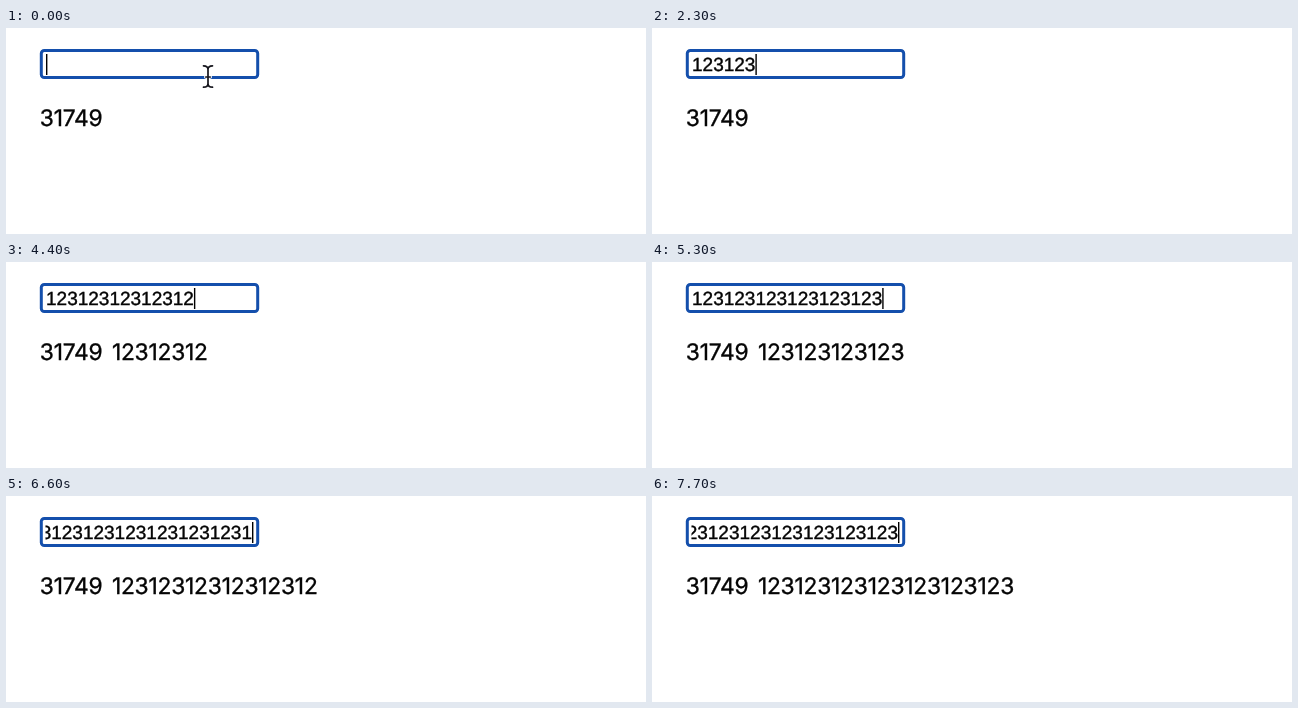
These frames come from a looping animation (640 px wide and 206 px high, 8 s). An HTML page:

```html
<!DOCTYPE html>
<html lang="en">
<head>
<meta charset="utf-8">
<title>Delayed echo</title>
<style>
  html, body { margin: 0; width: 100%; height: 100%; overflow: hidden; background: #fff; }
  svg { display: block; width: 640px; height: 206px; }
  text { fill: #050505; stroke: #050505; text-rendering: geometricPrecision; white-space: pre; }
  .label { font: 22.8px Inter, sans-serif; stroke-width: .35; }
  .entry { font: 19px "Liberation Sans", Arial, sans-serif; stroke-width: .4; }
</style>
</head>
<body>
<svg viewBox="0 0 640 206">
  <clipPath id="inside"><rect x="39.5" y="24" width="209" height="25"/></clipPath>
  <rect x="35.3" y="22.5" width="216.4" height="27" rx="3" fill="#fff" stroke="#144fac" stroke-width="3"/>
  <g clip-path="url(#inside)"><text id="entry" class="entry" x="40" y="42.5"></text></g>
  <rect id="caret" x="40" y="26" width="1.4" height="21" fill="#000"/>
  <g id="pointer" fill="none" stroke-linecap="round">
    <path id="beam" stroke="#fff" stroke-width="3.6"
      d="M197.5 37.8 Q202 37.8 202 41.5 Q202 37.8 206.5 37.8 M202 41.5 V55.5
         M197.5 59.2 Q202 59.2 202 55.5 Q202 59.2 206.5 59.2 M199.8 49 H204.2"/>
  </g>
  <text id="name" class="label" x="33.8" y="98.2">31749</text>
  <text id="echo" class="label" x="105.9" y="98.2"></text>
</svg>
<script>
const LOOP = 8000;
const ECHO_DELAY = 1520;
const LEFT = 40, CARET_MAX = 246;
const GROUP_PITCH = 36.6;

// Typing comes in bursts with a steady rhythm.
const bursts = [
  { start: 1000, gap: 200, keys: 3 },
  { start: 1720, gap: 255, keys: 9 },
  { start: 4090, gap: 235, keys: 6 },
  { start: 5640, gap: 240, keys: 3 },
  { start: 6520, gap: 240, keys: 1 },
  { start: 7450, gap: 150, keys: 2 },
];

const [entry, caret, pointer, beam, name, echo] =
  ["entry", "caret", "pointer", "beam", "name", "echo"].map(id => document.getElementById(id));

// A dark core over the light outline of the pointer.
const core = beam.cloneNode();
core.removeAttribute("id");
core.setAttribute("stroke", "#15151c");
core.setAttribute("stroke-width", "1.7");
pointer.append(core);

echo.textContent = "123";
const spacing = (GROUP_PITCH - echo.getComputedTextLength()) / 3;
for (const line of [name, echo]) line.style.letterSpacing = spacing + "px";

function typedAt(t) {
  let count = 0;
  for (const { start, gap, keys } of bursts) {
    if (t >= start) count += Math.min(keys, 1 + Math.floor((t - start) / gap));
  }
  return "123".repeat(Math.ceil(count / 3)).slice(0, count);
}

function draw(t) {
  entry.textContent = typedAt(t);
  echo.textContent = typedAt(t - ECHO_DELAY);
  const width = entry.textContent ? entry.getComputedTextLength() : 0;
  const end = Math.min(LEFT + width, CARET_MAX);
  entry.setAttribute("x", end - width);
  caret.setAttribute("x", end);
  pointer.style.display = t < bursts[0].start ? "" : "none";
}

const start = performance.now();
function tick() {
  draw((performance.now() - start) % LOOP);
  requestAnimationFrame(tick);
}
tick();
</script>
</body>
</html>
```
